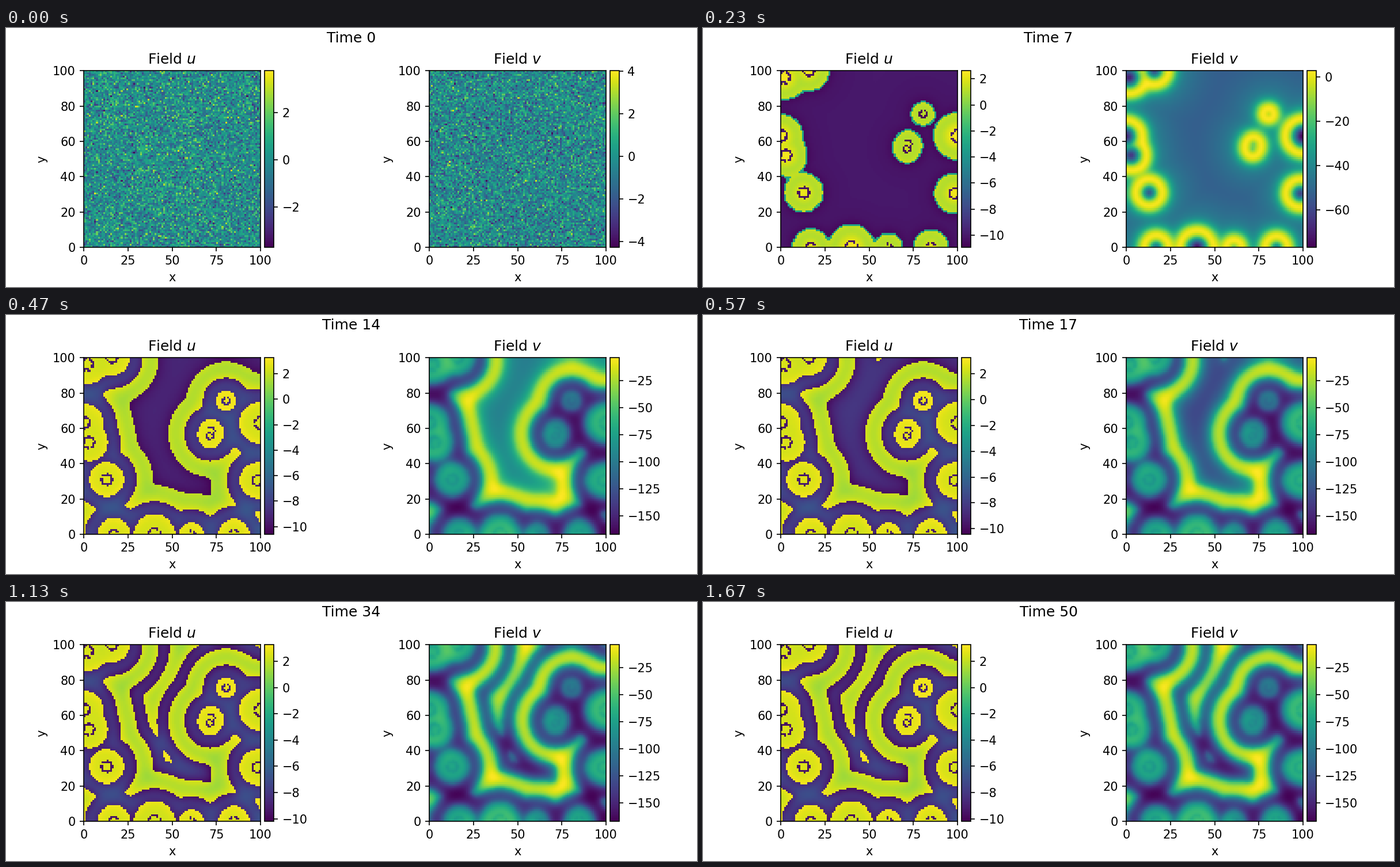
Animation, 1200 px wide and 450 px high, one loop 1710 ms. Source, as a matplotlib script:

```python
import numpy as np
import matplotlib.pyplot as plt
from matplotlib.animation import FuncAnimation
from mpl_toolkits.axes_grid1 import make_axes_locatable

W, H, DPI = 1200, 450, 150
LOOP_MS, STEP_MS = 1710, 15
LAST_TIME, SETTLED_TIME = 50, 23
N = 100

plt.rcParams["font.family"] = "DejaVu Sans"
rng = np.random.default_rng(12)
noise = rng.normal(size=(2, N, N))
speckle = rng.random((N, N))
Y, X = np.mgrid[0:N, 0:N] + 0.5

# Spots that survive (x, y, radius); every later stripe follows from them
SPOTS = [(2, 96, 12), (16, 100, 11), (0, 63, 12), (3, 52, 11.5),
         (13, 31, 10.6), (100, 63, 13), (98.3, 30.5, 11), (17, 0, 10),
         (40, 0, 12.5), (61, 0, 7.5), (85, 0, 9.5), (80.5, 75.5, 6.3),
         (72, 58.5, 7.2), (71.5, 55.5, 7.2)]
STRIPE_OFFSET, STRIPE_HALF = 11.8, 4.5
LATE_OFFSET = 22.8


def ramp(t, start, stop):
    return float(np.clip((t - start) / (stop - start), 0, 1))


def mix(a, b, s):
    return a + (b - a) * s


def rescale(field, low, high):
    return mix(low, high, (field - field.min()) / np.ptp(field))


def smooth(field, length):
    """Screened diffusion with reflecting edges."""
    tile = np.block([[field, field[:, ::-1]], [field[::-1], field[::-1, ::-1]]])
    k = 2 * np.pi * np.fft.fftfreq(2 * N)
    gain = 1 / (1 + length**2 * (k[:, None]**2 + k**2))
    return np.fft.ifft2(np.fft.fft2(tile) * gain).real[:N, :N]


def near(x, y):
    return np.hypot(X - x, Y - y)


def spot_distance(scale, blend=1.2):
    """Signed distance to the spots, smoothly joined."""
    parts = [np.exp((r * scale - near(x, y)) / blend) for x, y, r in SPOTS]
    return -blend * np.log(np.sum(parts, axis=0))


fading = rng.uniform(0, N, (26, 2))
seeds = np.any([near(x, y) < 1.7 for x, y, _ in SPOTS]
               + [near(x, y) < 1.2 for x, y in fading], axis=0)
seed_v = rescale(smooth(seeds * 1.0, 2.5), -173.8, -137.6)
cores = np.any([np.abs(near(x, y) - 0.27 * r) < 0.7 for x, y, r in SPOTS], axis=0)
cores &= speckle > 0.2


def branch_u(on, v):
    """Activator on the upper or lower branch of a folded curve."""
    high = 0.5 + 0.23 * np.sqrt(np.maximum(8 - v, 0))
    low = -5.4 - 0.41 * np.sqrt(np.maximum(v + 180, 0))
    return np.where(on, high, low)


def front_v(d):
    """Inhibitor while the fronts run: a crest just behind each edge."""
    crest = 42 * np.exp(-((d + 3) / 4.5)**2)
    halo = 18 * np.exp(-np.maximum(d, 0) / 12)
    return smooth(crest + halo - 55 - 8 * np.maximum(-d - 6, 0), 1)


def settled_v(spots, stripes, unfilled):
    level = smooth(stripes + 0.75 * spots, 3.6) + 0.4 * smooth(unfilled, 3)
    return rescale(level, -166.9, -4)


def fields(t):
    if t == 0:
        return rescale(noise[0], -3.71, 3.78), rescale(noise[1], -4.27, 4.03)
    if t <= 3:
        v = mix(smooth(noise[1], 1.5), seed_v, t / 3)
        return branch_u(seeds, v), v

    d = spot_distance(np.interp(t, [3, 7, 9], [0, 1, 0.92]))
    spots = (d < 0) & ~cores
    stripes = np.abs(d - STRIPE_OFFSET) < STRIPE_HALF * ramp(t, 8, 13)
    stripes |= d > LATE_OFFSET + 10 * (1 - ramp(t, 14, 20))
    on = spots | stripes

    if t <= 7:
        v = mix(seed_v, front_v(d), ramp(t, 3, 7))
    else:
        unfilled = (d > STRIPE_OFFSET + STRIPE_HALF) * (1 - ramp(t, 14, 21))
        v = mix(front_v(d), settled_v(spots, stripes, unfilled), ramp(t, 7, 13))
    u = branch_u(on, v)
    if t <= 7:
        u[(d > 0) & (d < 0.9)] = -3  # cells caught halfway by the front
    return u, v


states = [fields(t) for t in range(SETTLED_TIME + 1)]

fig, axes = plt.subplots(1, 2, figsize=(W / DPI, H / DPI), dpi=DPI,
                         layout="constrained")
title = fig.suptitle("Time 0")


def panel(ax, name, data):
    image = ax.imshow(data, origin="lower", extent=(0, N, 0, N),
                      interpolation="nearest", cmap="viridis")
    ax.set(xlabel="x", ylabel="y", title=f"Field ${name}$",
           xticks=range(0, 101, 25), yticks=range(0, 101, 20))
    cax = make_axes_locatable(ax).append_axes("right", size="5%", pad="2.5%")
    fig.colorbar(image, cax=cax)
    return image


images = [panel(ax, name, data) for ax, name, data in zip(axes, "uv", states[0])]
fig.canvas.draw()
fig.set_layout_engine("none")  # keep the solved layout for all frames


def update(frame):
    ms = frame * STEP_MS + 10
    t = min((3 * ms + 10) // 100, LAST_TIME)
    title.set_text(f"Time {t}")
    for image, data in zip(images, states[min(t, SETTLED_TIME)]):
        image.set_data(data)
        image.set_clim(data.min(), data.max())
    return [title, *images]


anim = FuncAnimation(fig, update, frames=LOOP_MS // STEP_MS, interval=STEP_MS,
                     repeat=True, repeat_delay=0, blit=False)
plt.show()
```
